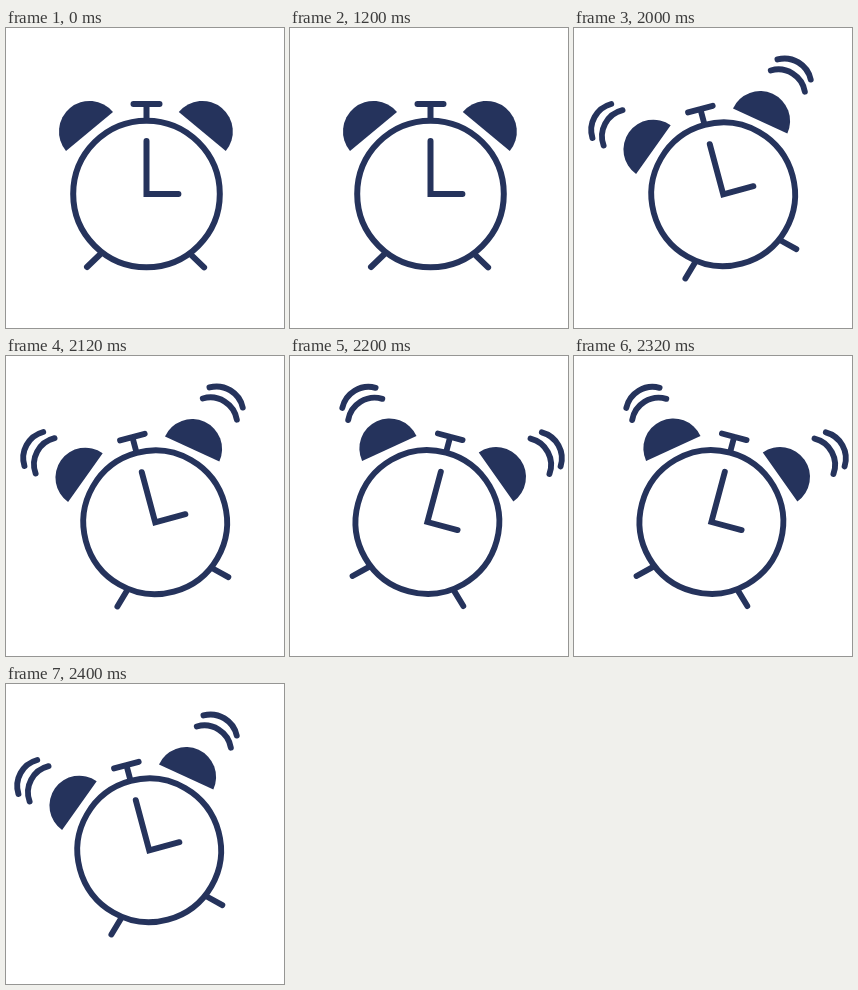
Recreate the animation shown at these times as an HTML page. Size 278 by 300 pixels, loop 2.6 s.

```html
<!DOCTYPE html>
<html lang="en">
<head>
<meta charset="utf-8">
<title>Ringing alarm clock</title>
<style>
  html, body { margin: 0; width: 100%; height: 100%; overflow: hidden; background: #fff; }
  svg { display: block; width: 100%; height: 100%; }
  .line { fill: none; stroke: #25335c; stroke-width: 6; stroke-linecap: round; }
  .solid { fill: #25335c; }
</style>
</head>
<body>
<svg viewBox="0 0 278 300">
  <defs>
    <path id="bell" class="solid" d="M-80.5 -43A30.5 30.5 0 0 1 -33.5 -82Z"/>
    <path id="foot" class="line" d="M-46 60L-59.5 73"/>
    <path id="waves" class="line" d="M-115.3 -90A27.5 27.5 0 0 1 -87.8 -118.6M-106.3 -79.6A27.5 27.5 0 0 1 -78.3 -109.5"/>
  </defs>
  <g id="clock">
    <use href="#bell"/>
    <use href="#bell" transform="translate(-1.2 0) scale(-1 1)"/>
    <use href="#foot"/>
    <use href="#foot" transform="translate(-1.9 0.4) scale(-1 1)"/>
    <circle class="line" r="73.3"/>
    <path class="line" d="M-13 -90H13M0 -90V-74M0 -53V0H31.9"/>
    <g id="ringing" transform="translate(1.3 0)">
      <use href="#waves"/>
      <use href="#waves" transform="scale(-1 1)"/>
    </g>
  </g>
</svg>
<script>
  const LOOP = 2600;
  const REST = 2000;
  const SHAKE = 200;
  const restPose = { x: 140.5, y: 166, angle: 0, scale: 1 };
  const shakePoses = [
    { x: 149.2, y: 166.3, angle: -15, scale: 0.98 },
    { x: 137.4, y: 166, angle: 15, scale: 0.98 },
    { x: 143.2, y: 166.3, angle: -15, scale: 0.98 }
  ];
  const clock = document.getElementById("clock");
  const ringing = document.getElementById("ringing");

  function render(time) {
    const t = time % LOOP;
    const shaking = t >= REST;
    const pose = shaking ? shakePoses[Math.floor((t - REST) / SHAKE)] : restPose;
    clock.setAttribute("transform",
      `translate(${pose.x} ${pose.y}) rotate(${pose.angle}) scale(${pose.scale})`);
    ringing.setAttribute("visibility", shaking ? "visible" : "hidden");
  }

  const start = performance.now();
  function tick() {
    render(performance.now() - start);
    requestAnimationFrame(tick);
  }
  tick();
</script>
</body>
</html>
```
